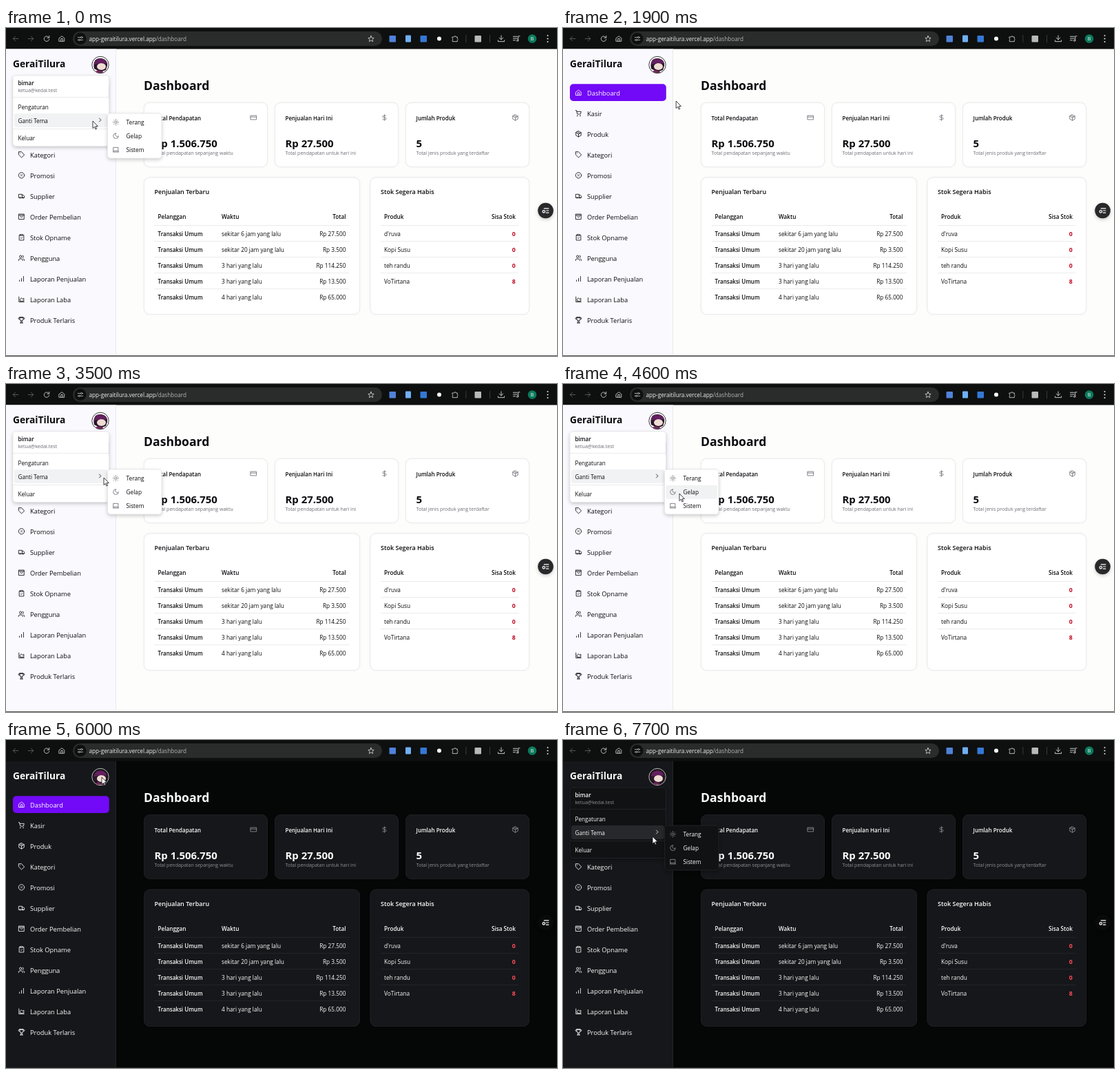
Write an HTML page that moves like this. It is 800 px wide and 476 px high and loops after 8000 ms.

```html
<!DOCTYPE html>
<html lang="id">
<head>
<meta charset="utf-8">
<title>Dashboard</title>
<style>
html, body { margin: 0; width: 100%; height: 100%; overflow: hidden; }
svg { display: block; width: 800px; height: 476px; font-family: 'Open Sans', 'Noto Sans', sans-serif;
  --bg: #fdfdfc; --side: #faf9fd; --card: #fff; --pop: #fff; --line: #e6e6e8; --ink: #0c0c10; --dim: #6c6c75;
  --hover: #f1f2f3; --red: #c00820; --fab: #29292b; --ring: #222; --face: #fff; --edge: #555; --shade: #0003; }
svg.dark { --bg: #050606; --side: #16171a; --card: #16171a; --pop: #111214; --line: #27282b; --ink: #fafafa; --dim: #909198;
  --hover: #27282b; --red: #ff4d58; --fab: #0a0a0b; --ring: #ccc; --face: #1b1719; --edge: #222; --shade: #0005; }
.pop { filter: drop-shadow(0 2px 2.5px var(--shade)); }
.flat { filter: drop-shadow(0 .6px .8px #0001); }
</style>
</head>
<body>
<svg id="stage" viewBox="0 0 800 476"></svg>
<script>
const INK = 'var(--ink)', DIM = 'var(--dim)', LINE = 'var(--line)', CARD = 'var(--card)', POP = 'var(--pop)', RED = 'var(--red)';

const text = (x, y, s, size, weight = 400, fill = INK, anchor = 'start') =>
  `<text x="${x}" y="${y}" font-size="${size}" font-weight="${weight}" fill="${fill}" text-anchor="${anchor}">${s}</text>`;
const box = (x, y, w, h, r, fill, stroke = 'none') =>
  `<rect x="${x}" y="${y}" width="${w}" height="${h}" rx="${r}" fill="${fill}" stroke="${stroke}" stroke-width=".8"/>`;
const dot = (x, y, r, fill, extra = '') => `<circle cx="${x}" cy="${y}" r="${r}" fill="${fill}" ${extra}/>`;
const rule = (x1, x2, y) => `<path d="M${x1} ${y}H${x2}" stroke="${LINE}" stroke-width=".8"/>`;
const group = (id, body, cls = '') => `<g id="${id}" class="${cls}">${body}</g>`;
// Icons use a 24-unit grid, centred on (x, y)
const icon = (x, y, d, color = INK, size = 10, width = 2) =>
  `<path transform="translate(${x - size / 2} ${y - size / 2}) scale(${size / 24})" d="${d}" fill="none" stroke="${color}"
    stroke-width="${width}" stroke-linecap="round" stroke-linejoin="round"/>`;
const ring = (x, y, r) => `M${x + r} ${y}a${r} ${r} 0 1 1-${2 * r} 0 ${r} ${r} 0 0 1 ${2 * r} 0`;

const PACKAGE = 'M12 2l9 5v10l-9 5-9-5V7zM3 7l9 5 9-5M12 12v10M7.5 4.3l9 5.2';
const CHEVRON = 'M9 6l6 6-6 6';

const nav = [
  ['Dashboard', 'M3 10l9-7 9 7v11H3zM9 21v-9h6v9'],
  ['Kasir', 'M2 2h3l3 13h11l2-9H6' + ring(8, 20.5, 1) + ring(18, 20.5, 1)],
  ['Produk', PACKAGE],
  ['Kategori', 'M2 3v9l10 10 10-9L12 2H3zM7 7h.1'],
  ['Promosi', ring(12, 12, 10) + 'M15 9l-6 6M9 9h.1M15 15h.1'],
  ['Supplier', 'M14 18V6H2v12h2M9 18h6M19 18h3v-5l-3-4h-5' + ring(7, 18, 2) + ring(17, 18, 2)],
  ['Order Pembelian', 'M3 3h18v18H3zM3 7h18M16 10a4 4 0 0 1-8 0'],
  ['Stok Opname', 'M8 4H4v18h16V4h-4M8 2h8v4H8zM9 14l2 2 4-4'],
  ['Pengguna', 'M16 21v-2a4 4 0 0 0-4-4H6a4 4 0 0 0-4 4v2M22 21v-2a4 4 0 0 0-3-3.9M16 3.1a4 4 0 0 1 0 7.8' + ring(9, 7, 4)],
  ['Laporan Penjualan', 'M5 21v-4M12 21V11M19 21V4'],
  ['Laporan Laba', 'M3 3v18h18M7 17v-6l4-4 5 4 4-3v9z'],
  ['Produk Terlaris', 'M6 9H4a2 2 0 0 1 0-5h16a2 2 0 0 1 0 5h-2M6 2h12v7a6 6 0 0 1-12 0zM7 22h10M10 15v7M14 15v7']
];
const stats = [
  ['Total Pendapatan', 'Rp 1.506.750', 'Total pendapatan sepanjang waktu', 'M2 5h20v14H2zM2 10h20'],
  ['Penjualan Hari Ini', 'Rp 27.500', 'Total pendapatan untuk hari ini', 'M12 2v20M17 5H9.5a3.5 3.5 0 0 0 0 7h5a3.5 3.5 0 0 1 0 7H6'],
  ['Jumlah Produk', '5', 'Total jenis produk yang terdaftar', PACKAGE]
];
const sales = [
  ['sekitar 6 jam yang lalu', '27.500'], ['sekitar 20 jam yang lalu', '3.500'], ['3 hari yang lalu', '114.250'],
  ['3 hari yang lalu', '13.500'], ['4 hari yang lalu', '65.000']
];
const stock = [["d'ruva", 0], ['Kopi Susu', 0], ['teh randu', 0], ['VoTirtana', 8]];
const themes = [
  ['Terang', ring(12, 12, 4) + 'M12 2v2M12 20v2M2 12h2M20 12h2M5 5l1.4 1.4M17.6 17.6L19 19M5 19l1.4-1.4M17.6 6.4L19 5'],
  ['Gelap', 'M12 3a6 6 0 0 0 9 9 9 9 0 1 1-9-9z'],
  ['Sistem', 'M4 4h16v12H4zM4 16l-2 4h20l-2-4']
];

function toolbar() {
  const pale = '#d6d6d6', grey = '#666', back = '#0e0f0f';
  return box(0, 0, 800, 30.5, 0, back) + box(97, 5, 449, 21, 10.5, '#2a2b2b') + dot(108, 15.5, 8.5, back) +
    icon(14, 15.5, 'M21 12H3M11 4l-8 8 8 8', grey) + icon(36, 15.5, 'M3 12h18M13 4l8 8-8 8', grey) +
    icon(59, 15.5, 'M20 8a9 9 0 1 0 1 6M21 2v7h-7', pale) + icon(81, 15.5, nav[0][1], pale) +
    icon(108, 15.5, 'M2 7h10M20 7h2M2 17h2M12 17h10' + ring(16, 7, 3) + ring(8, 17, 3), pale, 9) +
    text(120.5, 18.9, 'app-geraitilura.vercel.app<tspan fill="#b4b4b4">/dashboard</tspan>', 8.2, 400, '#eee') +
    icon(530, 15.5, 'M12 2l3 7 7 .6-5.4 4.9L18.3 22 12 18l-6.300 4 1.700-7.500L2 9.600 9 9z', pale) +
    box(556.5, 11, 9.5, 9.5, 1, '#4f82d8') + box(580, 10.5, 8, 10, 1, '#70b0f4') + box(601.5, 11, 9.5, 9.5, 1, '#3478d4') +
    dot(629, 15.5, 3, '#fff') +
    icon(652, 15.5, 'M3 6h6a3 3 0 0 1 6 0h5v6a3 3 0 0 1 0 5v5H3v-6a3 3 0 0 0 0-5z', pale) +
    box(667.5, 10, .8, 11, 0, '#444') + box(680.5, 11, 9.5, 9.5, 1, '#b9b9b9') + box(702, 10, .8, 11, 0, '#444') +
    icon(719, 15.5, 'M12 2v13M6 9l6 6 6-6M2 17v4h20v-4', pale, 11) +
    icon(741, 15.5, 'M2 5h13M2 11h13M2 17h7M18 18V4h5' + ring(15.5, 18, 2.5), pale, 11) +
    dot(764, 15.5, 6.3, '#0b7a5c') + text(764, 18, 'B', 7, 400, '#fff', 'middle') +
    [11, 15.5, 20].map(y => dot(786.5, y, 1.1, pale)).join('');
}

function avatar() {
  return dot(137, 53.5, 12.2, 'var(--face)', 'stroke="var(--ring)" stroke-width=".9"') +
    '<path d="M128 59c-2-9 1-15 9-15 7 0 11 5 10 11l-2 6-8 3z" fill="#2a152b"/>' +
    '<ellipse cx="138.500" cy="56" rx="6.500" ry="5" fill="#efdcd2"/>' +
    '<path d="M128 53c0-6 5-9 10-8.500 5 0 8 4 8 7l-9-.5z" fill="#64205f"/>' +
    '<path d="M130 63l4-2 6 2 2 2h-9z" fill="#6f2a58"/>';
}

function sidebar() {
  return box(0, 30.5, 160, 446, 0, 'var(--side)') + box(159.2, 30.5, .8, 446, 0, LINE) +
    text(10, 57, 'GeraiTilura', 13.75, 700) + avatar() + box(10, 81.2, 139.8, 24.8, 5, '#7209f7') +
    nav.map(([name, d], i) => {
      const y = 94 + 30 * i, color = i ? INK : '#fff';
      return icon(22.5, y - .2, d, color) + text(35, y + 3.9, name, 9.3, 400, color);
    }).join('');
}

const card = (x, y, w, h) => `<g class="flat">${box(x + .4, y + .4, w - .8, h - .8, 8.5, CARD, LINE)}</g>`;

function dashboard() {
  const rowY = i => 301.7 + 23 * i;
  const rules = (x1, x2, n) => Array.from({ length: n }, (_, i) => rule(x1, x2, 286.5 + 23 * i)).join('');
  const head = (x, s, anchor) => text(x, 277.4, s, 8.2, 600, INK, anchor);
  return text(200, 90, 'Dashboard', 17.6, 700) +
    stats.map(([title, value, note, d], i) => {
      const x = 200 + 190 * i;
      return card(x, 108, 180, 94) + text(x + 15.5, 133.8, title, 8, 600) + icon(x + 159.5, 130, d, DIM) +
        text(x + 15.5, 172.6, value, 14.95, 700) + text(x + 15.5, 184.4, note, 7.03, 400, DIM);
    }).join('') +
    card(200, 216.5, 314, 199.5) + text(215.5, 241.2, 'Penjualan Terbaru', 9, 600) +
    head(220.5, 'Pelanggan') + head(313, 'Waktu') + head(493.5, 'Total', 'end') + rules(215.5, 498.5, 5) +
    sales.map(([when, sum], i) => text(220.5, rowY(i), 'Transaksi Umum', 8.05, 600) + text(313, rowY(i), when, 8.3) +
      text(493.5, rowY(i), 'Rp ' + sum, 8.3, 400, INK, 'end')).join('') +
    card(528.5, 216.5, 231.5, 199.5) + text(544, 241.2, 'Stok Segera Habis', 9, 600) +
    head(549, 'Produk') + head(740, 'Sisa Stok', 'end') + rules(544, 744.5, 4) +
    stock.map(([name, left], i) => text(549, rowY(i), name, 8.3) + text(739.7, rowY(i), left, 8.7, 700, RED, 'end')).join('');
}

function menus() {
  const menu = box(10, 69, 139.5, 102.5, 4.4, POP, LINE) + group('themeHover', box(12, 124, 135, 20, 3, 'var(--hover)')) +
    text(17.5, 83.4, 'bimar', 8.1, 600) + text(17.5, 93.4, 'ketua@kedai.test', 7.1, 400, DIM) +
    rule(10, 149.5, 100.5) + text(17.5, 117.5, 'Pengaturan', 8.2) + text(17.5, 137.5, 'Ganti Tema', 8.2) +
    icon(136.7, 133.5, CHEVRON) + rule(10, 149.5, 146.5) + text(17.5, 163, 'Keluar', 8.2);
  const sub = box(147.5, 124, 78.5, 65, 4.4, POP, LINE) + themes.map(([name, d], i) => {
    const y = 136.7 + 20 * i;
    return group('item' + i, box(149.5, y - 10, 74.5, 20, 3, 'var(--hover)')) + icon(159.5, y, d, DIM) + text(174.5, y + 3.6, name, 8.3);
  }).join('');
  return group('menu', menu, 'pop') + group('sub', sub, 'pop');
}

const stage = document.getElementById('stage');
stage.innerHTML = box(0, 30, 800, 446, 0, 'var(--bg)') + toolbar() + sidebar() + dashboard() +
  group('fab', dot(783.5, 265, 11.3, 'var(--fab)') +
    icon(783, 265, 'M8 5h15M15 12h8M15 19h8' + ring(7, 15, 4), '#fff', 10.5, 2.8), 'pop') +
  menus() + box(0, 475, 800, 1, 0, 'var(--edge)') +
  '<path id="cursor" d="M0 0V10.5L2.5 8.3 4 12 5.6 11.3 4 7.7H7.4Z" fill="#fff" stroke="#111" stroke-width=".8"/>';

const path = [
  [0, 126, 135], [100, 126, 135], [900, 181, 140], [1000, 183, 142], [1600, 183, 142], [2300, 139, 58], [2700, 139, 58],
  [3200, 130, 135], [3500, 142, 136], [3900, 171, 139], [4400, 169, 157], [4600, 169, 159], [4700, 154, 108],
  [5200, 143, 64], [5800, 139, 54], [7300, 139, 54], [7700, 130, 140], [8000, 130, 140]
];

function cursorAt(t) {
  const i = path.findIndex(p => p[0] > t), a = path[i - 1], b = path[i];
  const k = (t - a[0]) / (b[0] - a[0]);
  return [a[1] + (b[1] - a[1]) * k, a[2] + (b[2] - a[2]) * k];
}

const el = id => document.getElementById(id);
const show = (id, on) => el(id).style.display = on ? '' : 'none';
const during = (t, ...spans) => spans.some(([from, to]) => t >= from && t < to);

function draw(now) {
  const t = Math.floor(now % 8000 / 100) * 100;
  const [x, y] = cursorAt(t);
  stage.classList.toggle('dark', t >= 4700);
  show('menu', during(t, [0, 1600], [2500, 4700], [7300, 8000]));
  show('sub', during(t, [0, 1600], [3200, 4700], [7600, 8000]));
  show('themeHover', during(t, [0, 500], [3100, 4700], [7600, 8000]));
  themes.forEach((_, i) => show('item' + i, x > 148 && Math.floor((y - 126.7) / 20) === i));
  el('cursor').setAttribute('transform', `translate(${x} ${y})`);
  requestAnimationFrame(draw);
}
draw(performance.now());
</script>
</body>
</html>
```
